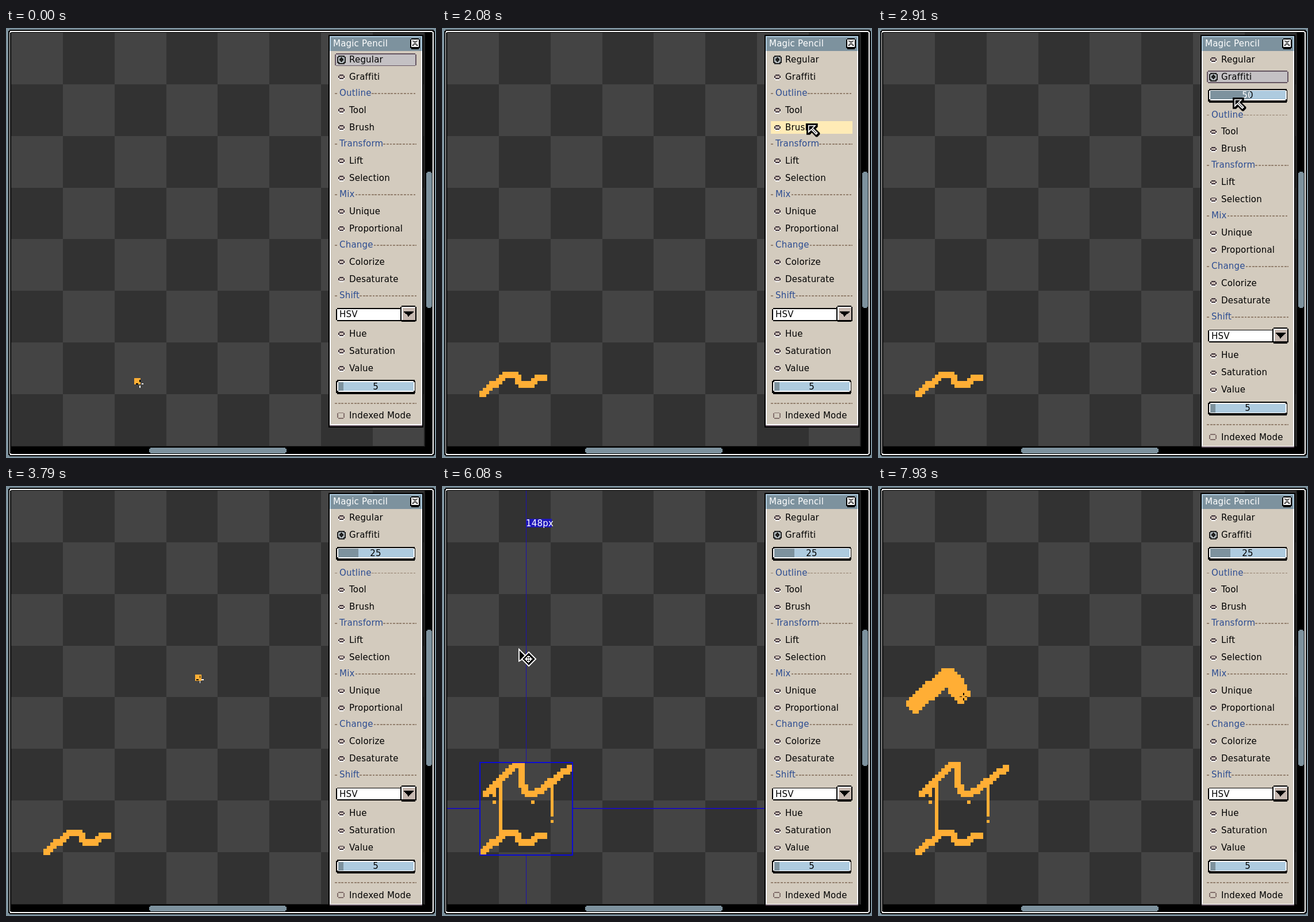
An HTML page with a canvas for the animation above (8000 ms loop, 748x748 px).

```html
<!DOCTYPE html>
<html lang="en">
<head>
<meta charset="utf-8">
<title>Magic Pencil</title>
<style>
  html, body { margin: 0; width: 100%; height: 100%; overflow: hidden; background: #7d929e; }
  canvas { display: block; width: 100vw; height: 100vh; }
</style>
</head>
<body>
<canvas id="stage" width="748" height="748"></canvas>
<script>
const c = document.getElementById('stage').getContext('2d');
const LOOP = 8000, UNIT = 1.87, EDGE = 5, CELL = 3;
const SLATE = '#7d929e', BEIGE = '#d3cbbe', BROWN = '#655561', ORANGE = '#ffae35',
      NAVY = '#2c4c91', SKY = '#aecbdf', HOVER = '#ffebb6', BLUE = '#0808e0';
const CLICK = 2570, DRAG = 3280, DRIP = 5120, GROW = 6400;

// interface units to stage pixels
const X = u => Math.round(u * UNIT);
const Y = u => Math.round(u * UNIT - 0.9);
const clamp = k => Math.min(1, Math.max(0, k));
const mix = (a, b, k) => a + (b - a) * k;

// ---- pointer gestures, in sprite pixels; those with a size paint ----
let end = [39.9, 108.7];
const gestures = [];
function go(from, to, points, size) {
  const line = [end, ...points];
  const lengths = points.map(([x, y], i) => Math.hypot(x - line[i][0], y - line[i][1]));
  const total = lengths.reduce((a, b) => a + b);
  gestures.push({ from, to, line, lengths, total, size });
  end = points[points.length - 1];
}
go(50, 770, [[11.5, 112.5]]);
go(790, 1440, [[18.5, 106.5], [21.5, 106.5], [23.5, 109.5], [26.5, 109.5], [28.5, 107.5], [30.5, 107.5]], 2);
go(1740, 2393, [[111.4, 28], [109, 14.4]]);
go(CLICK, 3030, [[108.3, 20.1]]);
go(DRAG, 3460, [[107.6, 20.1]]);
go(3640, 4340, [[12.5, 94.5]]);
go(4500, 4940, [[21.5, 85.5], [23.5, 85.5], [23.5, 91.5], [25.5, 94.5], [27.5, 94.5], [38.5, 86.5]], 2);
go(5590, 6370, [[22, 49.3], [23.5, 47.5]]);
go(6430, 7180, [[6.7, 71.9], [9.5, 68.5]]);
go(7230, 7240, [[10.5, 66.5]]);
go(7420, 7920, [[19.5, 58.5], [21.5, 58.5], [24.9, 63.9]], 6);

// distance covered: painting runs evenly, other moves slow down
function travelled(g, t) {
  const k = clamp((t - g.from) / (g.to - g.from));
  return g.total * (g.size ? k : 1 - (1 - k) ** 3);
}
function pointAt(g, dist) {
  let i = 0;
  while (i < g.lengths.length - 1 && dist > g.lengths[i]) dist -= g.lengths[i++];
  const k = clamp(dist / g.lengths[i]), [a, b] = [g.line[i], g.line[i + 1]];
  return [mix(a[0], b[0], k), mix(a[1], b[1], k)];
}

// ---- drawing helpers ----
function box(x0, y0, x1, y1, color) {
  c.fillStyle = color;
  c.fillRect(X(x0), Y(y0), X(x1) - X(x0), Y(y1) - Y(y0));
}
// box with its corner units cut off
function soft(x0, y0, x1, y1, color) {
  box(x0 + 1, y0, x1 - 1, y1, color);
  box(x0, y0 + 1, x1, y1 - 1, color);
}
function text(s, x, y, color = '#000', align = 'left') {
  c.font = "15px 'DejaVu Sans', sans-serif";
  c.letterSpacing = '0.2px';
  c.textAlign = align;
  c.fillStyle = color;
  c.fillText(s, X(x), Y(y) + 5);
}
function poly(x, y, pts, fill, line, width = 1) {
  c.beginPath();
  pts.forEach(([a, b]) => c.lineTo(X(x) + a * UNIT, Y(y) + b * UNIT));
  c.closePath();
  c.fillStyle = fill;
  c.fill();
  c.strokeStyle = line;
  c.lineWidth = width * UNIT;
  c.stroke();
}

// ---- sprite ----
let cells = new Set();
const key = (x, y) => x * 256 + y;

function stamp([cx, cy], size) {
  const x = Math.floor(cx) - size / 2, y = Math.floor(cy) - size / 2;
  for (let r = 0; r < size; r++) {
    const inset = Math.max(0, Math.abs(r - (size - 1) / 2) - 0.5);
    for (let i = inset; i < size - inset; i++) cells.add(key(x + i, y + r));
  }
}
function paint(g, t) {
  const reach = travelled(g, t) + 1e-6;
  let start = 0;
  g.lengths.forEach((len, s) => {
    const [a, b] = [g.line[s], g.line[s + 1]];
    const n = Math.ceil(Math.max(Math.abs(b[0] - a[0]), Math.abs(b[1] - a[1])));
    for (let i = 0; i <= n && start + len * i / n <= reach; i++)
      stamp([mix(a[0], b[0], i / n), mix(a[1], b[1], i / n)], g.size);
    start += len;
  });
}
// paint runs down from the line and ends in a loose drop
function drip(x, bottom) {
  let y = 80;
  while (y < bottom && !cells.has(key(x, y))) y++;
  for (; y <= bottom; y++) cells.add(key(x, y));
  cells.add(key(x, bottom + 2));
}
function drawSprite() {
  for (const k of cells) {
    const x = EDGE + (k >> 8) * CELL, y = EDGE + (k & 255) * CELL;
    box(x, y, x + CELL, y + CELL, ORANGE);
  }
}

// ---- editor ----
function drawEditor() {
  box(0, 0, 401, 401, SLATE);
  c.fillStyle = SLATE;
  c.fillRect(0, 0, 748, 748);
  ['#000', '#fff', '#000'].forEach((color, i) => soft(2 + i, 2 + i, 399 - i, 399 - i, color));
  box(EDGE, EDGE, 390, 390, '#222');
  const size = CELL * 16;
  for (let i = 0; i < 8; i++)
    for (let j = 0; j < 8; j++) {
      const x = EDGE + i * size, y = EDGE + j * size;
      box(x, y, x + size, y + size, (i + j) % 2 ? '#323232' : '#444');
    }
  soft(133, 391, 261, 396, SLATE);
  soft(391, 134, 396, 261, SLATE);
}
function drawGuides() {
  const line = '#1c10b0';
  box(78.3, 5, 78.8, 257, line);
  box(78.3, 344, 78.8, 389, line);
  box(5, 300, 35, 301, line);
  box(122, 300, 389, 301, line);
  c.strokeStyle = BLUE;
  c.lineWidth = UNIT;
  c.strokeRect(X(35) + 1, Y(257) + 1, X(86), X(86));
  box(78, 31, 102, 39, '#2018b8');
  text('148px', 78, 35, '#fff');
}

// ---- panel ----
function dashes(x, y) {
  for (; x < 382; x += 3) box(x, y, Math.min(382, x + 2), y + 1, '#94816f');
}
function heading(s, y) {
  text(s, 310, y, NAVY);
  box(306, y, 308, y + 1, '#94816f');
  dashes(Math.ceil(310 + c.measureText(s).width / UNIT), y);
}
function radio(s, y, tip, on, focus) {
  const [x0, x1, y0, y1] = [306, 382, y - 6, y + 6];
  if (focus) {
    soft(x0, y0, x1, y1, BROWN);
    box(x0 + 1, y0 + 1, x1 - 1, y1 - 1, '#c4c1c4');
  } else if (tip && tip[1] >= y0 && tip[1] < y1) box(x0, y0, x1, y1, HOVER);
  if (on) {
    ['#222', '#b4bcc0', '#222', '#b4bcc0'].forEach((color, i) =>
      soft(308 + i, y - 4 + i, 316 - i, y + 4 - i, color));
  } else {
    soft(309, y - 1, 315, y + 3, '#fff');
    soft(309, y - 2, 315, y + 2, '#3c3038');
    box(310, y - 1, 314, y + 1, '#c6b8b0');
  }
  text(s, 319.5, y);
}
function slider(v, y) {
  const [x, top, bottom] = [309, y - 4, y + 4], split = x + 1.3 + v * 0.71;
  soft(x - 2, top - 2, 381, bottom + 3, '#000');
  soft(x - 1, top - 1, 380, bottom + 1, '#fff');
  const half = (from, to, back, ink) => {
    c.save();
    c.beginPath();
    c.rect(X(from), Y(top), X(to) - X(from), Y(bottom) - Y(top));
    c.clip();
    box(from, top, to, bottom, back);
    text(v, 344, y, ink, 'center');
    c.restore();
  };
  half(x, split, SLATE, '#fff');
  half(split, 379, SKY, '#000');
}
function combo(s, y) {
  soft(307, y - 6, 368, y + 6, '#000');
  box(308, y - 5, 367, y + 5, '#fff');
  text(s, 310, y);
  soft(367, y - 8, 382, y + 7, '#000');
  box(368, y - 7, 381, y + 5, '#fff');
  box(369, y - 6, 381, y + 5, '#c6b8b0');
  for (let i = 0; i < 5; i++) box(370 + i, y - 3 + i, 379 - i, y - 2 + i, '#000');
}
function drawPanel(t, tip) {
  const open = t >= CLICK, d = open ? 20 : 0, b = 372 + d;
  box(300, 7, 388, b, '#000');
  box(301, 8, 387, b - 1, '#fff');
  box(301, b - 2, 387, b - 1, BROWN);
  box(302, 9, 386, b - 3, BEIGE);
  box(301, 8, 387, 22, SKY);
  box(302, 9, 386, 22, SLATE);
  text('Magic Pencil', 304.5, 15, '#fff');

  soft(376, 10, 385, 20, '#000');
  box(377, 11, 384, 18, '#fff');
  for (let i = 0; i < 5; i++) {
    box(378 + i, 12 + i, 379 + i, 13 + i, '#000');
    box(382 - i, 12 + i, 383 - i, 13 + i, '#000');
  }

  radio('Regular', 30, tip, !open, t < 780);
  radio('Graffiti', 46, tip, open, open && t < DRAG);
  if (open) slider(t < DRAG ? 50 : Math.round(mix(28, 25, clamp((t - DRAG) / 180))), 63);

  const groups = [['Outline', 'Tool', 'Brush'], ['Transform', 'Lift', 'Selection'],
    ['Mix', 'Unique', 'Proportional'], ['Change', 'Colorize', 'Desaturate']];
  groups.forEach(([name, ...items], i) => {
    const y = 61 + i * 47 + d;
    heading(name, y);
    items.forEach((s, j) => radio(s, y + 16 + j * 16, tip));
  });
  heading('Shift', 249 + d);
  combo('HSV', 267 + d);
  ['Hue', 'Saturation', 'Value'].forEach((s, i) => radio(s, 285 + i * 16 + d, tip));
  slider(5, 334 + d);
  dashes(306, 349 + d);
  soft(308, 358 + d, 315, 364 + d, '#83706c');
  box(309, 359 + d, 314, 363 + d, BEIGE);
  text('Indexed Mode', 319.5, 361 + d);
}

// ---- pointers ----
function drawArrow(x, y) {
  poly(x, y, [[0.5, 0.5], [10, 0.5], [10, 3], [8, 5], [12, 9], [12, 10], [10, 12],
              [9, 12], [5, 8], [3, 10], [0.5, 10]], '#000', '#000');
  poly(x, y, [[2, 2], [8, 2], [5.5, 4.5], [10, 9], [9, 10], [4.5, 5.5], [2, 8]], '#000', '#fff', 0.9);
}
function drawMove(x, y) {
  poly(x, y, [[0.5, 0], [0.5, 11], [7.5, 7]], '#000', '#fff');
  const diamond = r => [[0, -r], [r, 0], [0, r], [-r, 0]];
  const mx = Math.round(x + 8.5), my = Math.round(y + 8);
  poly(mx + 0.5, my + 0.5, diamond(6.5), '#000', '#fff');
  box(mx, my - 3, mx + 1, my + 4, '#fff');
  box(mx - 3, my, mx + 4, my + 1, '#fff');
  for (const s of [-2, 2]) {
    box(mx - 1, my + s, mx + 2, my + s + 1, '#fff');
    box(mx + s, my - 1, mx + s + 1, my + 2, '#fff');
  }
}
function drawCross(x, y) {
  const cell = u => Math.floor((u - EDGE) / CELL);
  for (const [dx, dy] of [[1, 0], [-1, 0], [0, 1], [0, -1]])
    for (const n of [2, 3]) {
      const u = Math.floor(x) + dx * n, v = Math.floor(y) + dy * n;
      box(u, v, u + 1, v + 1, cells.has(key(cell(u), cell(v))) ? '#000' : '#fff');
    }
}

function draw(t) {
  const current = gestures.filter(g => g.from <= t).pop() || gestures[0];
  const pos = pointAt(current, travelled(current, t));
  const [x, y] = pos.map(p => EDGE + p * CELL);
  const inPanel = x > 300, moving = t >= 5640 && t < 6370;
  const painting = current.size && t <= current.to;

  cells = new Set();
  gestures.filter(g => g.size && g.from <= t).forEach(g => paint(g, t));
  if (t >= DRIP) [[14, 94], [16, 106], [26, 94], [32, 100]].forEach(([col, row]) => drip(col, row));
  if (!inPanel && !moving && !painting) stamp(pos, t < GROW ? 2 : 6);

  drawEditor();
  drawSprite();
  if (moving) drawGuides();
  drawPanel(t, inPanel ? [x, y] : null);
  if (inPanel) drawArrow(x, y);
  else if (moving) drawMove(x, y);
  else drawCross(x, y);
}

const start = performance.now();
function tick() {
  draw((performance.now() - start) % LOOP);
  requestAnimationFrame(tick);
}
tick();
</script>
</body>
</html>
```
